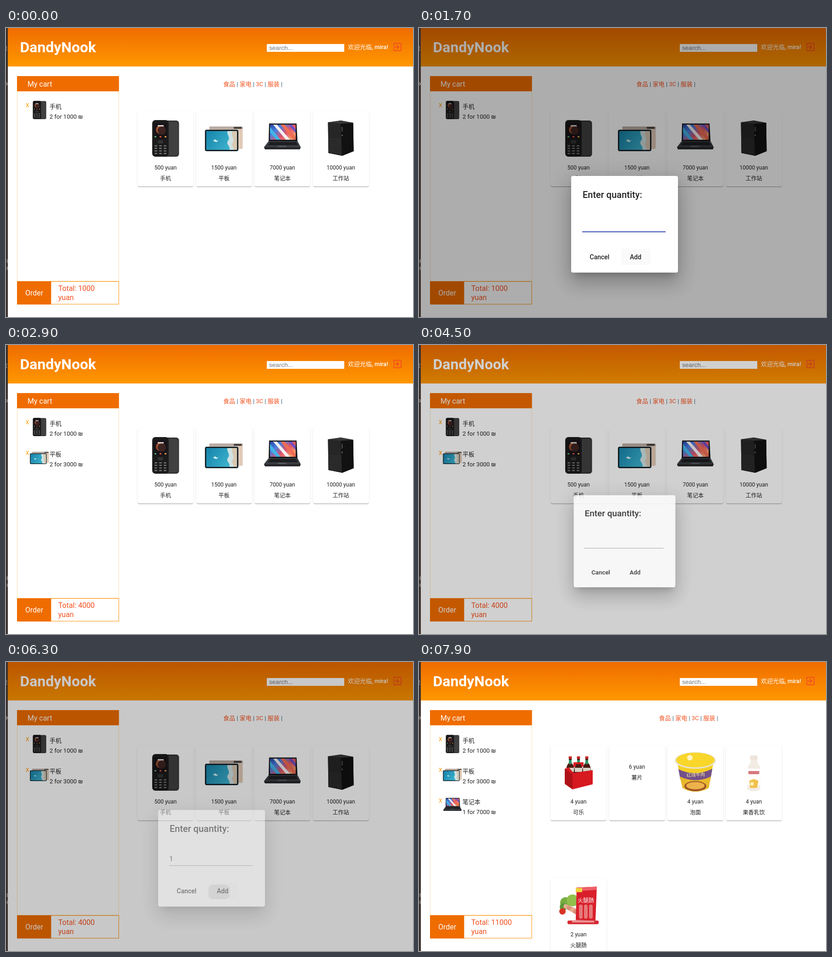
These frames come from a looping animation (888x631 px, 8 s). An HTML page:

```html
<!DOCTYPE html>
<html lang="zh-CN">
<head>
<meta charset="utf-8">
<title>Shop</title>
<style>
  html, body { margin: 0; width: 888px; height: 631px; overflow: hidden; background: #fff; }
  #stage { position: relative; width: 888px; height: 631px; overflow: hidden; }
  svg { position: absolute; left: 0; top: 0; overflow: visible; }
  text { font: 13px Roboto, "Noto Sans CJK SC", "Noto Sans CJK", sans-serif; white-space: pre; }
  .card { position: absolute; width: 122px; height: 164px; border-radius: 4px; background: #fff;
    box-shadow: 0 2px 1px -1px rgba(0,0,0,.2), 0 1px 1px rgba(0,0,0,.14), 0 1px 3px rgba(0,0,0,.12); }
  #shade { position: absolute; left: 4px; top: 0; width: 884px; height: 631px; background: #000; }
  #dialog { position: absolute; left: 332px; top: 323px; width: 233px; height: 211px; border-radius: 4px; background: #fff;
    box-shadow: 0 11px 15px -7px rgba(0,0,0,.2), 0 24px 38px 3px rgba(0,0,0,.14), 0 9px 46px 8px rgba(0,0,0,.12); }
  text.logo { font-size: 32px; font-weight: 700; }
  text.mid { font-size: 16px; }
  text.small { font-size: 12px; }
  text.bold { font-weight: 500; }
  text.title { font-size: 20px; font-weight: 500; }
  text.button { font-size: 14px; font-weight: 500; }
  text.value { font-size: 14px; }
  text.search { font: 13.6px "Liberation Sans", Arial, sans-serif; }
</style>
</head>
<body>
<div id="stage"></div>
<script>
const INK = '#212121', ORANGE = '#ef6c00', LINK = '#f4511e', INDIGO = '#3f51b5';

const text = (x, y, str, fill = INK, cls = '', more = '') =>
  `<text x="${x}" y="${y}" fill="${fill}" class="${cls}" ${more}>${str}</text>`;
const box = (x, y, w, h, fill, more = '') =>
  `<rect x="${x}" y="${y}" width="${w}" height="${h}" fill="${fill}" ${more}/>`;
const path = (d, fill, more = '') => `<path d="${d}" fill="${fill}" ${more}/>`;
const group = (id, body, more = '') => `<g id="${id}" ${more}>${body}</g>`;
const times = (n, fn) => Array.from({ length: n }, (_, i) => fn(i)).join('');
const ramp = (id, x2, y2, ...colors) =>
  `<linearGradient id="${id}" x2="${x2}" y2="${y2}">` +
  colors.map((c, i) => `<stop offset="${i / (colors.length - 1)}" stop-color="${c}"/>`).join('') +
  '</linearGradient>';

// Product pictures, each in an 84 x 84 square
const art = {
  phone:
    box(36, 3, 35.5, 79, '#353535', 'rx="6"') + box(42, 6, 27, 73, '#414141', 'rx="5"') +
    box(13, 2, 36, 80, '#1b1b1b', 'rx="7"') + box(17, 9, 28, 33, '#171318') +
    '<circle cx="31" cy="23" r="10" fill="#9b4f31"/><circle cx="34" cy="25" r="9" fill="#3d2422"/>' +
    box(25, 13, 13, 3, '#d8cfca') + box(18, 37, 4, 3, '#54a46b') + box(29, 37, 4, 3, '#d5533f') + box(40, 37, 4, 3, '#d99a40') +
    box(25, 46, 12, 7, '#333', 'rx="2"') +
    times(12, i => box(18 + i % 3 * 10, 57 + Math.floor(i / 3) * 5.6, 6, 2.4, '#777', 'rx="1"')),
  tablet:
    box(10, 16, 73, 49, '#e2cbb8', 'rx="3"') + box(10, 16, 73, 6, '#b9aba2', 'rx="2"') + box(63, 17, 18, 4, '#45413f', 'rx="2"') +
    box(.5, 23, 73, 47, '#17242b', 'rx="4"') + box(3.5, 26, 67, 41, 'url(#sea)') +
    path('M50 26C47 34 57 39 51 47S57 59 54 67H70.5V26Z', '#cfe3e4') +
    path('M60 26C57 36 66 43 61 51S65 61 63 67H70.5V26Z', '#d8c8b3') +
    path('M18 47l5-3 3 3 4-1-4 4-4-1Z', '#d9f0f3'),
  laptop:
    path('M13 9.5H73L75 49H12Z', '#17191d') + box(15, 12, 56, 33, 'url(#wall)') +
    path('M15 17L38 45H29L15 29Z', '#42b4e7') + path('M22 12H30L59 45H50Z', '#f4f0f2') +
    path('M38 12H47L71 39V45H66Z', '#f06c54') + path('M55 12H62L71 22V30Z', '#6e4fc2') +
    path('M12 48H75L82 61 80 66H4L2 61Z', '#3a3d41') + path('M15 50H72L76 57H10Z', '#1c1e21') +
    path('M33 58H50L52 62H31Z', '#55595d') + path('M2 61H82L80 66H4Z', '#26282b'),
  tower:
    path('M14 7L42 3 69 8 70 70 45 80 15 74Z', '#171717') + path('M14 7L42 10 45 80 15 74Z', '#262626') +
    path('M42 10L69 8 70 70 45 80Z', '#111') + path('M14 7L42 3 69 8 42 10Z', '#383838') +
    times(8, i => path(`M17 ${43 + i * 4}l25 ${1 + i * .2}`, 'none', 'stroke="#3d3d3d" stroke-width=".8"')) +
    box(44, 17, 2, 10, '#555') + box(44, 34, 2, 3, '#777'),
  cola:
    times(3, i => {
      const x = 18 + i * 18;
      return path(`M${x + 3} 9h6v12q6 7 6 17v12H${x - 3}V38q0-10 6-17Z`, '#4b1d14') +
        box(x + 2.5, 7, 7, 5, '#c62b28', 'rx="1"') + box(x + 3, 15, 6, 9, '#2d9265') + box(x - 2, 32, 16, 9, '#d6d4c8');
    }) +
    path('M12 34L21 31 31 43 73 37V68L29 79 12 67Z', '#d71920') + path('M12 34L29 46V79L12 67Z', '#ae1218') +
    path('M31 20H53V29H48V24H36V30H31Z', '#d71920'),
  noodle:
    path('M2 18H82L71 76Q42 92 14 76Z', '#f5cf24') + path('M5 35Q42 53 79 34L75 57Q42 70 9 57Z', '#74508a') +
    path('M8 51Q42 67 76 51L71 76Q42 92 14 76Z', '#e8b82c') +
    '<ellipse cx="42" cy="72" rx="24" ry="11" fill="#9c5525"/><ellipse cx="42" cy="71" rx="20" ry="8" fill="#edb24b"/>' +
    '<ellipse cx="42" cy="16" rx="45" ry="18" fill="#e8e4cf"/><ellipse cx="42" cy="15" rx="42" ry="16" fill="#f8d62a"/>' +
    '<circle cx="30" cy="10" r="6" fill="#fff4c2"/>' +
    text(23, 51, '红烧牛肉', '#fff1a2', 'small bold', 'transform="rotate(-3 42 50)" style="font-size:10px"'),
  milk:
    path('M35 10H50V21Q56 27 56 38V77Q53 83 42 83T28 77V38Q28 27 35 21Z', '#f2ece5') +
    box(34, 5, 16, 10, '#eee5dc', 'rx="2"') + box(28, 34, 28, 36, '#fff') + box(30, 39, 24, 7, '#d7797d', 'rx="2"') +
    path('M32 61Q42 53 52 61L49 76H34Z', '#f0c14d') + '<circle cx="38" cy="67" r="4" fill="#fff0b5"/>',
  sausage:
    '<circle cx="14" cy="37" r="12" fill="#78ad42"/><circle cx="29" cy="32" r="13" fill="#91bf4b"/><circle cx="9" cy="46" r="8" fill="#5e9738"/>' +
    '<circle cx="7" cy="56" r="7" fill="#d83525"/>' +
    times(4, i => box(9 + i * 7, 43 + i * 4, 33, 9, i % 2 ? '#d98f78' : '#e9ad91', `rx="4" transform="rotate(24 ${20 + i * 7} ${47 + i * 4})"`)) +
    path('M38 4L82 2 79 76 36 75Z', '#d91f2b') + path('M38 4L82 2V9L38 12Z', '#ee6067') +
    box(36, 5, 14, 9, '#f0d33a') +
    text(40, 36, '火腿肠', '#fff', 'bold', 'style="font-size:12px"') +
    times(3, i => box(43 + i * 11, 41, 8, 31, '#e67879', 'rx="4"')) +
    box(18, 76, 68, 8, '#d42a34', 'rx="3"') + box(28, 77, 48, 3, '#f1a5a4')
};

const pic = (name, x, y, size) => `<use href="#${name}" x="${x}" y="${y}" width="${size}" height="${size}"/>`;

const slots = [[348, 182], [475.5, 182], [603, 182], [730.5, 182], [348, 471.5]];
const label = (i, price, name, up) => {
  const [x, top] = slots[i], y = top + 127 - up;
  const mid = 'text-anchor="middle"';
  return text(x, y, price + ' yuan', INK, 'small', mid) + text(x, y + 24, name, INK, 'small', mid);
};
const gadgets = [['phone', 500, '手机'], ['tablet', 1500, '平板'], ['laptop', 7000, '笔记本'], ['tower', 10000, '工作站']];
const foods = [['cola', 4, '可乐'], [null, 6, '薯片'], ['noodle', 4, '泡面'], ['milk', 4, '果香乳饮'], ['sausage', 2, '火腿肠']];
const shelf = (goods, loaded = true) => goods.map(([img, price, name], i) => {
  const shown = img && loaded;
  return (shown ? pic(img, slots[i][0] - 42, slots[i][1] + 17, 84) : '') + label(i, price, name, shown ? 0 : 76);
}).join('');

const cartRow = (i, img, name, line) => group('row' + i,
  text(43, 173, 'X', '#ff9800', 'small') + pic(img, 52, 158, 42) +
  text(95, 175.5, name) + text(95, 197.5, line), `transform="translate(0 ${i * 67})"`);

const bar = '<tspan fill="#2a5a78"> | </tspan>';
const nav = group('nav',
  text(474, 127, ['食品', '家电', '3C', '服装', ''].join(bar), LINK) + group('hover', box(474, 128, 27, 1, LINK)));

const page =
  '<defs>' + ramp('head', 0, 1, ORANGE, '#ff9800') + ramp('sea', 1, .4, '#1583aa', '#3fb4cf') +
  ramp('wall', 1, .7, '#2745a6', '#4a7fe0', '#e0546b', '#f5a06b') +
  Object.entries(art).map(([id, body]) =>
    `<symbol id="${id}" viewBox="0 0 84 84" overflow="visible">${body}</symbol>`).join('') + '</defs>' +
  box(0, 0, 4, 631, '#3b302c') +
  text(-3, 49, 'E', '#ddd', '', 'style="font-size:10px"') + text(-2, 125, 'o', '#ddd', '', 'style="font-size:10px"') +
  box(2, 505, 1, 8, '#bbb') + box(2, 521, 1, 7, '#bbb') +
  box(4, 0, 884, 84, 'url(#head)') +
  text(30.5, 53, 'DandyNook', '#fff', 'logo') +
  box(569, 35, 169, 17, '#fff') + text(574, 48, 'search...', '#757575', 'search') +
  text(746, 46, '欢迎光临, mira!', '#fff', 'bold') +
  path('M10.1 15.6L11.5 17l5-5-5-5-1.4 1.4L12.7 11H3v2h9.7zM19 3H5a2 2 0 0 0-2 2v4h2V5h14v14H5v-4H3v4a2 2 0 0 0 2 2h14a2 2 0 0 0 2-2V5a2 2 0 0 0-2-2z',
    LINK, 'transform="translate(842 29.5)"') +
  box(24.5, 138.5, 221.5, 414, 'none', 'stroke="#ffe0b2"') +
  box(24, 105, 222.5, 33, ORANGE) + text(47, 128, 'My cart', '#fff', 'mid') +
  cartRow(0, 'phone', '手机', '2 for 1000 ₪') +
  cartRow(1, 'tablet', '平板', '2 for 3000 ₪') +
  cartRow(2, 'laptop', '笔记本', '1 for 7000 ₪') +
  box(24.5, 553.5, 221.5, 49.5, '#fff', 'stroke="#fb8c00"') +
  box(24, 553, 74.5, 50.5, ORANGE) + text(42, 584, 'Order', '#fff', 'mid') +
  text(114, 574, '', LINK, 'mid', 'id="total"') + text(114, 593.5, 'yuan', LINK, 'mid') +
  nav + group('gadgets', shelf(gadgets)) + group('bare', shelf(foods, false)) + group('foods', shelf(foods));

const form =
  text(357, 371, 'Enter quantity:', INK, 'title') +
  text(356.5, 434.5, '', INK, 'value', 'id="digit"') +
  box(356, 420, 1, 18, INDIGO, 'id="caret"') +
  box(356, 444, 182, 1, '#949494') + box(356, 444, 182, 2, INDIGO, 'id="line"') +
  box(441, 482, 64, 36, '#000', 'rx="4" id="focus"') +
  box(442, 486, 46, 32, '#000', 'rx="10" opacity=".1" id="ripple"') +
  '<circle id="dot" cx="478.5" cy="499.5" r="4.5" opacity=".1"/>' +
  text(372.5, 505, 'Cancel', INK, 'button') + text(460, 505, 'Add', INK, 'button');

document.getElementById('stage').innerHTML =
  slots.map(([x, y], i) => `<div class="card" id="card${i}" style="left:${x - 61}px;top:${y}px"></div>`).join('') +
  `<svg width="888" height="631">${page}</svg><div id="shade"></div>` +
  `<div id="dialog"><svg width="233" height="211" viewBox="332 323 233 211">${form}</svg></div>`;

const el = id => document.getElementById(id);
const show = (id, on) => { el(id).style.display = on ? '' : 'none'; };
const clamp = v => Math.max(0, Math.min(1, v));

function bezier(x1, y1, x2, y2) {
  const at = (a, b, s) => 3 * (1 - s) ** 2 * s * a + 3 * (1 - s) * s * s * b + s ** 3;
  return v => {
    const p = clamp(v);
    let lo = 0, hi = 1;
    for (let i = 0; i < 24; i++) {
      const m = (lo + hi) / 2;
      if (at(x1, x2, m) < p) lo = m; else hi = m;
    }
    return at(y1, y2, lo);
  };
}
const swift = bezier(.25, .8, .25, 1), enter = bezier(0, 0, .2, 1), smooth = bezier(.35, 0, .25, 1);

const visits = [
  { open: 560, click: 1220, type: 2000, digit: '2', press: 2300, blur: 2500, close: 2560 },
  { open: 4425, click: 5020, type: 5600, digit: '1', press: 5900, blur: 6200, close: 6260 }
];
const LOOP = 8000, STEP = 100;

function drawDialog(t) {
  const v = visits.find(v => t >= v.open && t < v.close + 400);
  show('shade', v);
  show('dialog', v && t < v.close + 75);
  if (!v) return;
  el('shade').style.opacity = .32 * (swift((t - v.open) / 400) - swift((t - v.close) / 400));

  const grow = enter((t - v.open) / 150);
  el('dialog').style.opacity = grow * (1 - clamp((t - v.close) / 75));
  el('dialog').style.transform = `scale(${.7 + .3 * grow})`;

  const clicked = t >= v.click, typed = t >= v.type, blurred = t >= v.blur;
  const blinkFrom = typed ? v.type : v.click - 20;
  show('caret', clicked && !blurred && Math.floor((t - blinkFrom) / 500) % 2 === 0);
  el('caret').setAttribute('x', typed ? 364 : 356);
  el('digit').textContent = typed ? v.digit : '';

  const w = 182 * (.5 + .5 * swift((t - v.click) / 300));
  show('line', clicked && !blurred);
  el('line').setAttribute('x', 447 - w / 2);
  el('line').setAttribute('width', w);

  const gain = smooth((t - v.open - 150) / 200), loss = smooth((t - v.click) / 200);
  el('focus').setAttribute('opacity', .12 * gain - .1 * loss);
  show('dot', t >= v.press && !blurred);
  show('ripple', blurred);
}

function draw(time) {
  const t = Math.floor(time / STEP) * STEP;
  const second = t >= 2700, third = t >= 6400, food = t >= 7800, loaded = t >= 7900;
  show('row1', second);
  show('row2', third);
  el('total').textContent = 'Total: ' + (third ? 11000 : second ? 4000 : 1000);
  show('hover', t >= 7600 && !food);
  el('nav').setAttribute('transform', `translate(${food ? 49.5 : 0} 0)`);
  show('gadgets', !food);
  show('bare', food && !loaded);
  show('foods', loaded);
  show('card4', food);
  drawDialog(t);
}

const start = performance.now();
function tick() {
  draw((performance.now() - start) % LOOP);
  requestAnimationFrame(tick);
}
tick();
</script>
</body>
</html>
```
